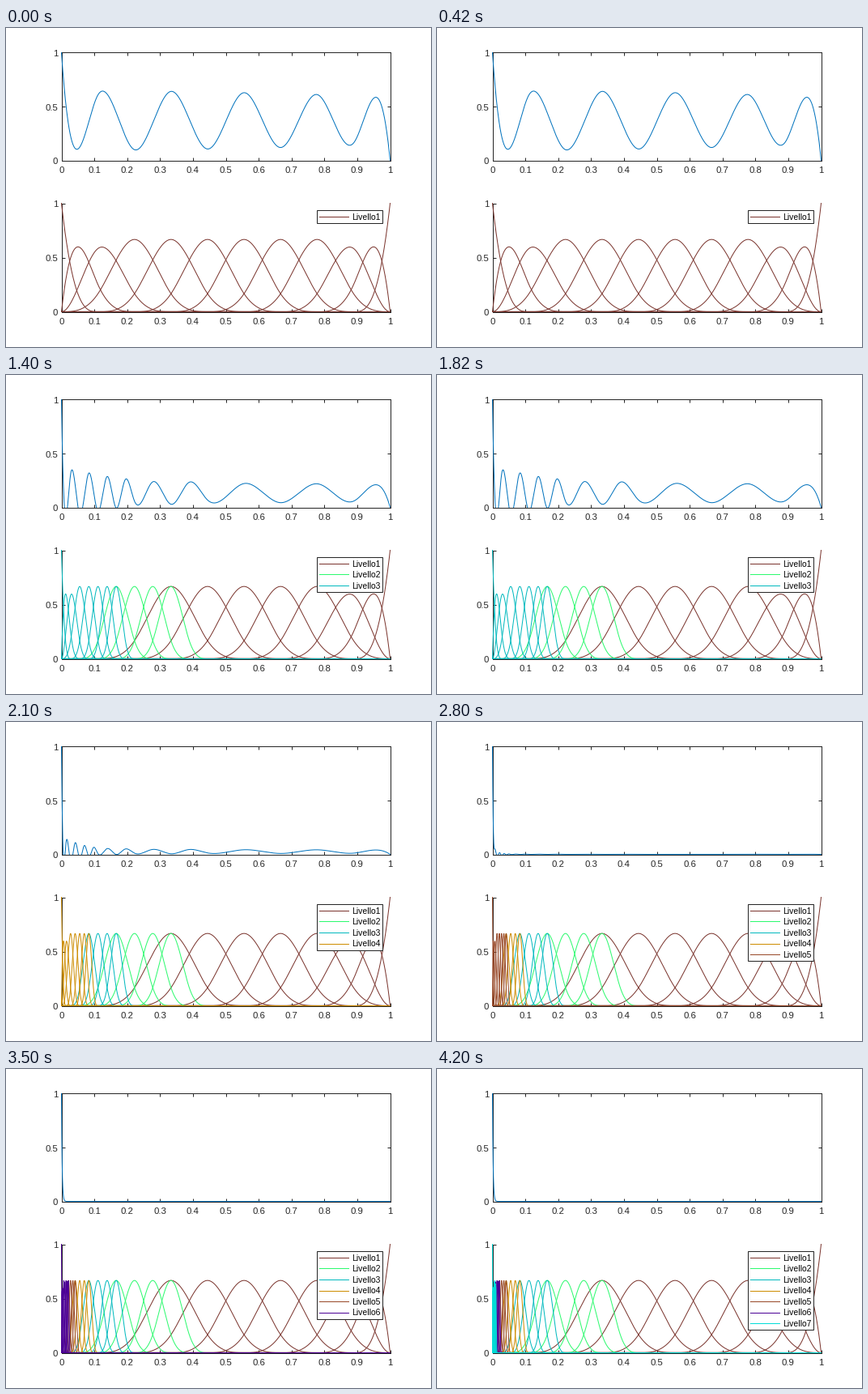
A matplotlib script that plays this animation: 525x394 px, repeating every 4.9 s.

```python
import numpy as np
import matplotlib.pyplot as plt
from matplotlib.animation import FuncAnimation
from matplotlib.patches import Rectangle

W, H, DPI = 525, 394, 100
PX = 72 / DPI                       # one pixel in points
LEVELS, CELLS, DEG = 7, 9, 3
EPS = 0.002                         # diffusion in eps*u'' + u' = 0
LEFT, RIGHT = 68.5, 474.5
INK = (0.15, 0.15, 0.15)
BLUE = "#0072BD"
COLORS = ["#7A342D", "#2CFA6E", "#00B9BE", "#CD8C00",
          "#984828", "#4B0096", "#00DCD7"]

plt.rcParams["font.family"] = "Liberation Sans"


def knot(j, n):
    return min(max(j - DEG, 0), n) / n


def bspline(i, p, n, x):
    """B-spline i of degree p on n equal cells with clamped ends."""
    a, b = knot(i, n), knot(i + 1, n)
    if p == 0:
        return ((x >= a) & ((x < b) | ((b == 1) & (x == 1) & (a < b)))).astype(float)
    c, d = knot(i + p, n), knot(i + p + 1, n)
    out = np.zeros_like(x)
    if c > a:
        out += (x - a) / (c - a) * bspline(i, p - 1, n, x)
    if d > b:
        out += (d - x) / (d - b) * bspline(i + 1, p - 1, n, x)
    return out


def slope(i, n, x):
    out = np.zeros_like(x)
    for k, sign in ((i, 1), (i + 1, -1)):
        span = knot(k + DEG, n) - knot(k, n)
        if span > 0:
            out += sign * DEG / span * bspline(k, DEG - 1, n, x)
    return out


def cells(level):
    return CELLS * 2 ** level


def active(level, last):
    """Whether each basis function of a level survives refinement up to last."""
    count = CELLS + DEG if level == 0 else 8
    return range(0 if level == last else 4, count)


# Gauss points on the finest mesh
fine = cells(LEVELS - 1)
gp, gw = np.polynomial.legendre.leggauss(4)
quad_x = ((np.arange(fine)[:, None] + (gp + 1) / 2) / fine).ravel()
quad_w = np.tile(gw / (2 * fine), fine)
xs = np.linspace(0, 1, 1001)

keys = [(l, i) for l in range(LEVELS) for i in active(l, l)]
shape = {k: bspline(k[1], DEG, cells(k[0]), xs) for k in keys}
value = {k: bspline(k[1], DEG, cells(k[0]), quad_x) for k in keys}
deriv = {k: slope(k[1], cells(k[0]), quad_x) for k in keys}


def solve(last):
    """Galerkin solution with u(0) = 1 and u(1) = 0."""
    end = (0, CELLS + DEG - 1)
    start = (last, 0)
    free = [(l, i) for l in range(last + 1) for i in active(l, last)
            if (l, i) not in (start, end)]
    v = np.array([value[k] for k in free])
    dv = np.array([deriv[k] for k in free])
    test = (EPS * dv - v) * quad_w
    coef = np.linalg.solve(test @ dv.T, -test @ deriv[start])
    return shape[start] + coef @ np.array([shape[k] for k in free])


solutions = [solve(l) for l in range(LEVELS)]

fig = plt.figure(figsize=(W / DPI, H / DPI), dpi=DPI, facecolor="white")


def plot_area(top, bottom, boxed):
    ax = fig.add_axes([LEFT / W, 1 - bottom / H, (RIGHT - LEFT) / W, (bottom - top) / H])
    ax.set(xlim=(0, 1), ylim=(0, 1), facecolor="none",
           xticks=np.linspace(0, 1, 11), yticks=[0, 0.5, 1])
    ax.tick_params(direction="in", length=4 * PX, width=PX, color=INK, top=boxed,
                   right=boxed, labelbottom=False, labelleft=False)
    for side, spine in ax.spines.items():
        spine.set(linewidth=PX, edgecolor=INK, zorder=1,
                  visible=boxed or side in ("left", "bottom"))
    return ax


def add_curve(ax, y, color):
    line, = ax.plot(xs, y, color=color, lw=PX, zorder=3)
    px, py = 0.5 / (RIGHT - LEFT), 0.5 / 134
    line.set_clip_path(Rectangle((-px, -py), 1 + 2 * px, 1 + 2 * py,
                                 transform=ax.transAxes))
    return line


AREAS = [(30.5, 163.5), (216.5, 350.5)]
upper = plot_area(*AREAS[0], True)
lower = plot_area(*AREAS[1], False)

# Overlay in pixel coordinates for labels and legend
page = fig.add_axes([0, 0, 1, 1], facecolor="none", zorder=5)
page.set(xlim=(0, W), ylim=(H, 0))
page.axis("off")

for top, bottom in AREAS:
    for t in np.linspace(0, 1, 11):
        page.text(LEFT + t * (RIGHT - LEFT), bottom + 15.5, f"{t:.1g}",
                  size=11.4 * PX, color=INK, ha="center", va="baseline")
    for t in (0, 0.5, 1):
        page.text(64, bottom - t * (bottom - top) + 4.7, f"{t:g}",
                  size=11.4 * PX, color=INK, ha="right", va="baseline")

curve = add_curve(upper, solutions[0], BLUE)
basis = {k: add_curve(lower, shape[k], COLORS[k[0]]) for k in keys}

ROW = 13.55
frame_box = Rectangle((383.5, 224.5), 81, 16, facecolor="white", edgecolor=INK, lw=PX)
page.add_patch(frame_box)
entries = []
for l, color in enumerate(COLORS):
    y = 232.9 + l * ROW
    mark, = page.plot([387, 423], [y, y], color=color, lw=PX)
    label = page.text(427, y + 3.8, f"Livello{l + 1}", size=10.4 * PX,
                      color="black", va="baseline")
    entries.append((mark, label))


def draw(last):
    curve.set_ydata(solutions[last])
    for (l, i), line in basis.items():
        line.set_visible(l <= last and i in active(l, last))
    frame_box.set_height(16.5 + last * ROW)
    for l, parts in enumerate(entries):
        for part in parts:
            part.set_visible(l <= last)
    return []


anim = FuncAnimation(fig, draw, frames=LEVELS, init_func=lambda: draw(0),
                     interval=700, repeat=True, repeat_delay=0)
plt.show()
```
